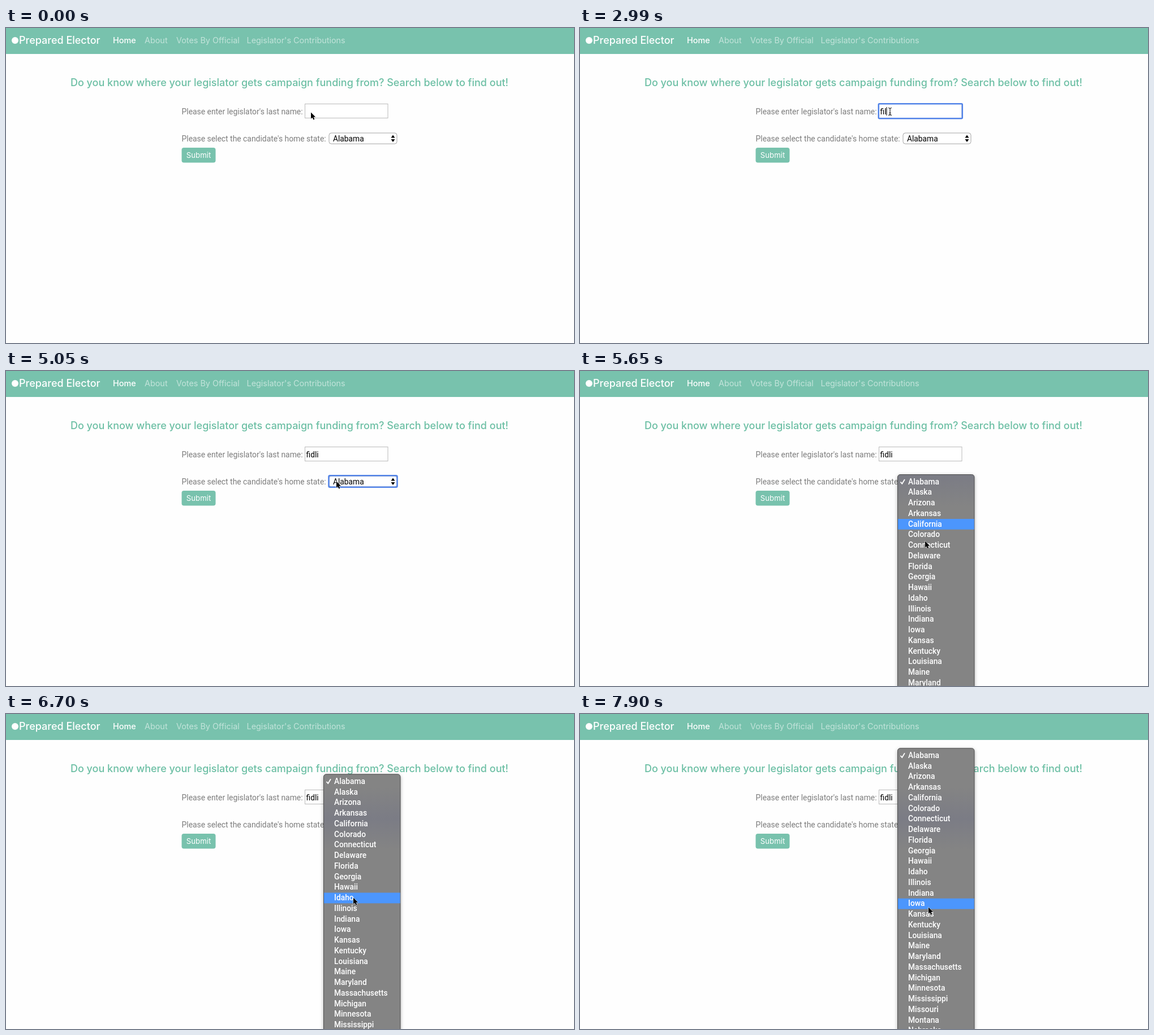
These frames come from a looping animation (1004 by 558 pixels, 8 s). An HTML page:

```html
<!DOCTYPE html>
<html lang="en">
<head>
<meta charset="utf-8">
<title>Legislator search</title>
<style>
  html, body { margin: 0; width: 100%; height: 100%; overflow: hidden; background: #fefefe; }
  svg { display: block; width: 1004px; height: 558px; }
  text { white-space: pre; }
  .display { font-family: Inter, sans-serif; fill: #fff; }
  .body { font: 13.9px Roboto, sans-serif; fill: #7d7d7d; }
  .control { font: 13.8px Roboto, sans-serif; fill: #000; }
  .title { font-size: 18px; font-weight: 500; }
  .nav { font-size: 14.4px; }
  .dim { opacity: .55; }
  .ring { fill: none; stroke: #5283e8; stroke-width: 2.5; }
  #menu text { font: 500 13.8px Roboto, sans-serif; fill: #fff; }
  #sheet { filter: drop-shadow(0 2px 3px rgba(0, 0, 0, .3)); }
</style>
</head>
<body>
<svg viewBox="0 0 1004 558">
  <defs>
    <linearGradient id="tint" gradientUnits="userSpaceOnUse" x1="0" x2="0" y1="130" y2="240">
      <stop offset="0" stop-color="#848484"/>
      <stop offset=".5" stop-color="#7b7c85"/>
      <stop offset="1" stop-color="#848484"/>
    </linearGradient>
  </defs>

  <rect width="1004" height="46" fill="#78c2ad"/>
  <g class="display">
    <circle cx="16" cy="22" r="6"/>
    <text class="title" x="23" y="28">Prepared Elector</text>
    <g class="nav">
      <text x="189" y="26.5" font-weight="500">Home</text>
      <g class="dim">
        <text x="245" y="26.5">About</text>
        <text x="301" y="26.5">Votes By Official</text>
        <text x="425.5" y="26.5">Legislator's Contributions</text>
      </g>
    </g>
    <text class="title" x="501" y="103" text-anchor="middle" fill="#6cbfa4">Do you know where your legislator gets campaign funding from? Search below to find out!</text>
    <rect x="310.5" y="212" width="60" height="26.5" rx="4" fill="#78c2ad"/>
    <text x="340.5" y="229.5" font-size="13.2" text-anchor="middle">Submit</text>
  </g>

  <text class="body" x="310.5" y="152.5">Please enter legislator's last name:</text>
  <text class="body" x="310.5" y="200.5">Please select the candidate's home state:</text>

  <rect x="528.5" y="134.5" width="146.5" height="25" fill="#fff" stroke="#bbb"/>
  <rect id="inputRing" class="ring" x="527.8" y="134.2" width="148" height="26" rx="1.5"/>
  <text id="entry" class="control" x="530.5" y="152.5"></text>
  <rect id="caret" y="140" width="1" height="15"/>

  <rect x="571" y="186" width="120" height="19.2" rx="4" fill="#fff" stroke="#a5a5a5"/>
  <rect id="selectRing" class="ring" x="570.5" y="185.3" width="121" height="20.4" rx="2"/>
  <text class="control" x="578" y="200.5">Alabama</text>
  <path d="M680.5 194.5l3.5-5 3.5 5zM680.5 197l3.5 5 3.5-5z"/>

  <g id="menu">
    <rect id="sheet" x="561.5" width="135.5" height="600" rx="4.5" fill="url(#tint)" stroke="#4c4c4c"/>
    <rect id="highlight" x="562" width="134.7" height="18.75" fill="#4c96fd"/>
    <g id="rows">
      <path d="M566.5 196.5l2.8 3.2 4.7-7.7" fill="none" stroke="#fff" stroke-width="1.8"/>
    </g>
  </g>

  <path id="arrow" d="M0-.5v11.3l2.5-2.4 1.9 4.2 2-.8-1.9-4.1h3.6z" stroke="#fff" stroke-width="1" paint-order="stroke"/>
  <path id="beam" d="M-3-6.5q2.5 0 3 1.5 .5-1.5 3-1.5M0-5v10M-3 6.5q2.5 0 3-1.5 .5 1.5 3 1.5M-1.5 2.5h3" fill="none" stroke="#111" stroke-width="1.1"/>
</svg>
<script>
const LOOP = 8000, ROW = 18.75, MENU_TOP = 183, ROW_TOP = 187;
const STATES = `Alabama Alaska Arizona Arkansas California Colorado Connecticut Delaware Florida
  Georgia Hawaii Idaho Illinois Indiana Iowa Kansas Kentucky Louisiana Maine Maryland
  Massachusetts Michigan Minnesota Mississippi Missouri Montana Nebraska`.split(/\s+/);

// Each track holds [start time, value...] steps.
const MOUSE = [
  [0, 539, 150], [750, 543, 149], [900, 546, 148], [1050, 548, 148],
  [4320, 550, 150], [4470, 557, 158], [4620, 569, 174], [4770, 579, 189], [4900, 584, 196],
  [5500, 598, 246], [5650, 610, 302], [5800, 614, 326], [7900, 616, 343],
];
const TYPED = [
  [0, ''], [2540, 'f'], [2690, 'fi'], [2990, 'fil'], [3290, 'fi'],
  [3440, 'fid'], [3590, 'fidl'], [3730, 'fidli'],
];
const CARET = [[0, 0], [1350, 1], [1800, 0], [2250, 1], [4170, 0], [4620, 1], [5050, 0]];
const CHOICE = [
  [0, 0], [5500, 1], [5650, 4], [5800, 7], [6100, 8], [6400, 9], [6550, 10],
  [6700, 11], [6850, 12], [7000, 13], [7900, 14],
];

const $ = id => document.getElementById(id);
const at = (track, t) => track.findLast(step => step[0] <= t).slice(1);
const show = (id, on) => $(id).setAttribute('visibility', on ? 'visible' : 'hidden');

STATES.forEach((name, i) => {
  const label = document.createElementNS('http://www.w3.org/2000/svg', 'text');
  label.setAttribute('x', 580);
  label.setAttribute('y', 200.5 + i * ROW);
  label.textContent = name;
  $('rows').append(label);
});

// The list climbs one notch every 150 ms, then once more at 7300.
function scrollOffset(t) {
  const notches = t < 6100 ? 0 : t < 7300 ? Math.min(7, Math.floor((t - 5950) / 150)) : 8;
  return notches * 15.34;
}

function draw() {
  const t = performance.now() % LOOP;

  const entry = $('entry');
  entry.textContent = at(TYPED, t)[0];
  $('caret').setAttribute('x', 530.5 + entry.getComputedTextLength());
  show('caret', at(CARET, t)[0]);
  show('inputRing', t >= 1350 && t < 5050);
  show('selectRing', t >= 5050 && t < 5200);

  const scroll = scrollOffset(t);
  show('menu', t >= 5200);
  $('sheet').setAttribute('y', MENU_TOP + .5 - scroll);
  $('highlight').setAttribute('y', ROW_TOP - scroll + at(CHOICE, t)[0] * ROW);
  $('rows').setAttribute('transform', `translate(0 ${-scroll})`);

  const [x, y] = at(MOUSE, t);
  const overInput = t >= 750 && t < 4620;
  for (const id of ['arrow', 'beam']) $(id).setAttribute('transform', `translate(${x} ${y})`);
  show('arrow', !overInput);
  show('beam', overInput);

  requestAnimationFrame(draw);
}
draw();
</script>
</body>
</html>
```
